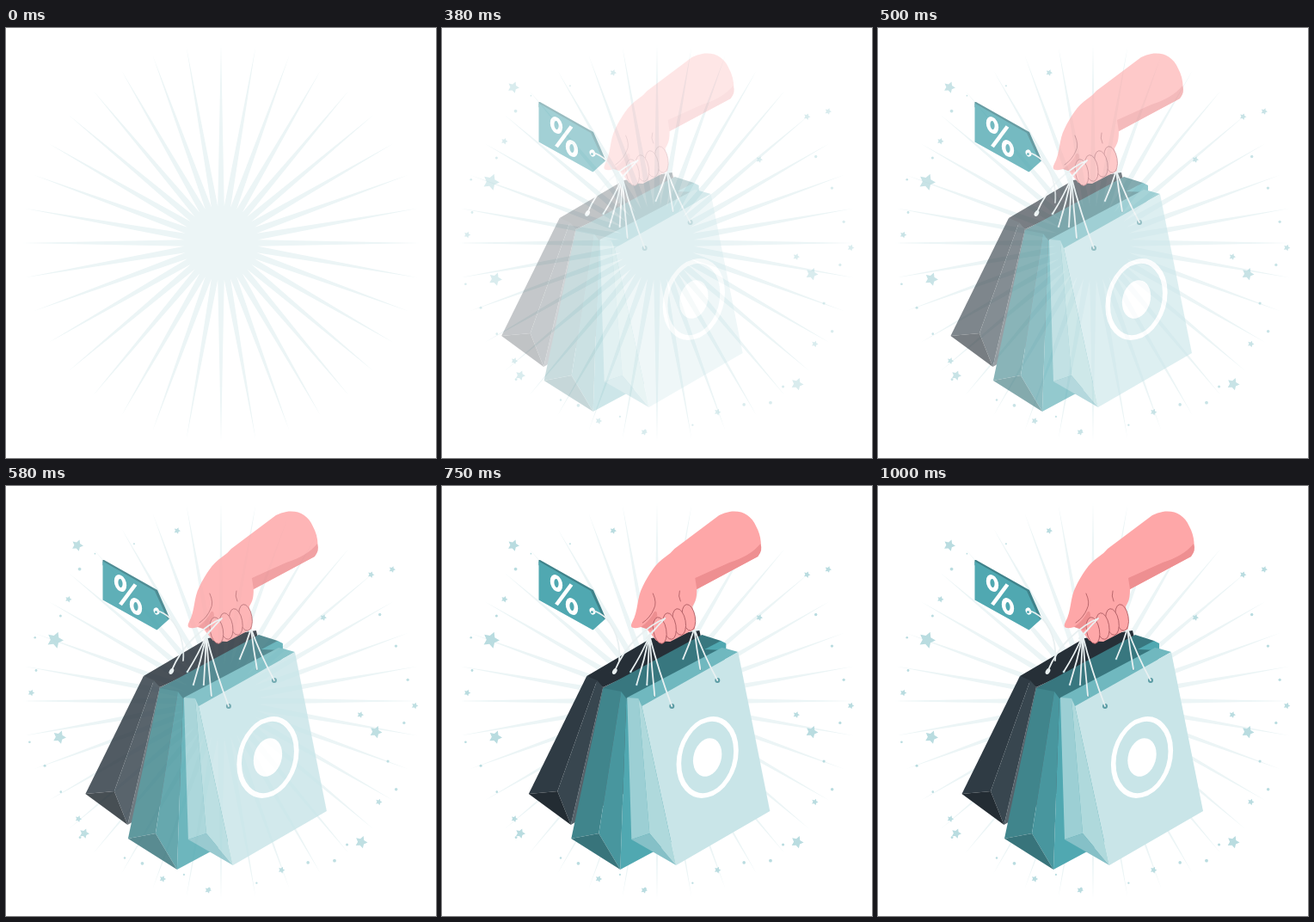
These frames come from a looping animation (500 px wide and 500 px high, 1.04 s). An HTML page:

```html
<!DOCTYPE html>
<html lang="en">
<head>
<meta charset="utf-8">
<title>Shopping bags</title>
<style>
  html, body { margin: 0; width: 100%; height: 100%; overflow: hidden; background: #fff; }
  svg { display: block; width: 100vw; height: 100vh; }
  .cord { fill: none; stroke: #e9f0f1; stroke-width: 1.8; stroke-linecap: round; }
  .crease { fill: none; stroke: #a9575e; stroke-width: .8; stroke-linecap: round; }
  .finger { fill: #fea7a8; stroke: #a9575e; stroke-width: .8; }
</style>
</head>
<body>
<svg viewBox="0 0 500 500">
  <path id="rays" fill="#ecf5f6"/>
  <g id="stars" fill="#b9dce0"></g>

  <g class="slide">
    <g class="slide">
      <g id="bags"></g>
      <g id="rightCords"></g>
      <g id="hand">
        <path fill="#fea7a8" d="M331 30C346 28 356 34 362 47C368 58 370 73 364 82L293 120C293 129 292 134 288 140L291 166L262 181L246 180L233 164C228 163 224 166 220 165C216 165 216 162 218 158C225 146 223 130 230 117C237 103 244 91 257 82Q263 78 267 73L319 34Q325 31 331 30Z"/>
        <path fill="#ee8f91" d="M367 67Q370 75 364 82L293 120L291 107L331 89Q356 81 367 67Z"/>
        <path fill="#ee8f91" d="M228 164Q239 156 243 147Q247 143 247 152L240 168Z"/>
        <g id="fingers"></g>
        <path class="crease" d="M242 125Q247 136 243 143Q239 153 230 159M273 122Q271 128 274 134"/>
      </g>
      <g id="leftCords"></g>
    </g>
    <g transform="translate(307 315.500) skewY(-13)">
      <ellipse rx="33.300" ry="43.800" fill="none" stroke="#fff" stroke-width="5.600"/>
      <ellipse rx="16.700" ry="22" fill="#fff"/>
    </g>
  </g>

  <g id="tag">
    <path fill="#3f828a" d="M112.500 86L114 86L176 121L190.500 154L187 156L112.500 92Z"/>
    <path fill="#50a8b1" d="M112.500 87.500L173 122L187.500 154L190 154.500L175.500 167.500L112.500 132.500Z"/>
    <g fill="none" stroke="#fff" stroke-width="4.600">
      <ellipse rx="4.900" ry="7.300" transform="translate(133 113) skewY(20)"/>
      <ellipse rx="4.900" ry="7.300" transform="translate(151 140) skewY(20)"/>
      <path d="M150.500 114.500L133 138"/>
    </g>
    <ellipse cx="175" cy="145.500" rx="3.200" ry="4.200" fill="#fff" transform="rotate(-25 175 145.500)"/>
    <circle cx="174.500" cy="146.500" r="1.500" fill="#50a8b1"/>
    <path class="cord" d="M176 145Q183 147 190 153Q202 166 205 183Q207 194 206 203"/>
  </g>
</svg>

<script>
  const LOOP = 1040, FPS = 24, SLIDE = 30;
  const $ = id => document.getElementById(id);

  function add(parent, name, attrs) {
    const el = document.createElementNS('http://www.w3.org/2000/svg', name);
    for (const k in attrs) el.setAttribute(k, attrs[k]);
    parent.append(el);
  }

  // Closed star outline with n points.
  function burst(cx, cy, n, outer, inner, turn = 0) {
    let d = '';
    for (let i = 0; i < 2 * n; i++) {
      const a = turn + Math.PI * i / n, r = i % 2 ? inner : outer;
      d += (i ? 'L' : 'M') + (cx + r * Math.cos(a)).toFixed(2) + ' ' + (cy + r * Math.sin(a)).toFixed(2);
    }
    return d + 'Z';
  }

  $('rays').setAttribute('d', burst(250, 250, 36, 232, 43));

  // Large stars have set places; small stars and dots are scattered around the rim.
  const star = (x, y, r) => add($('stars'), 'path', { d: burst(x, y, 5, r, r * .52, -1.2) });
  [
    [83, 69, 7], [57, 179, 10], [62, 292, 8], [91, 404, 6], [413, 414, 7.5], [430, 286, 7.5],
    [199, 52, 4], [449, 97, 4], [369, 153, 4], [412, 266, 4], [235, 470, 4]
  ].forEach(s => star(...s));

  let seed = 7;
  const random = () => (seed = seed * 16807 % 2147483647) / 2147483647;
  const SCATTER = 32;
  for (let i = 0; i < SCATTER; i++) {
    const a = -.7 + 5 * (i + random()) / SCATTER, dist = 205 + 25 * random();
    const cx = 250 + dist * Math.cos(a), cy = 250 + dist * Math.sin(a);
    if (i % 4 === 0) star(cx, cy, 4);
    else add($('stars'), 'circle', { cx, cy, r: .8 + 1.2 * random() });
  }

  // A bag is built from its corners: rim (back, fold, front), base, and right side.
  function bag(p, c) {
    const face = (fill, ...keys) =>
      add($('bags'), 'path', { fill, d: 'M' + keys.map(k => p[k]).join('L') + 'Z' });
    face(c.inside, 'back', 'backRight', 'tip', 'right', 'front');
    face(c.front, 'front', 'right', 'baseRight', 'foot');
    face(c.side, 'back', 'fold', 'baseFold', 'base');
    face(c.gusset, 'fold', 'front', 'foot', 'baseFold');
    face(c.bottom, 'base', 'baseFold', 'foot');
  }

  bag({
    back: '165 221', fold: '177 226', front: '184 234', backRight: '240 177', tip: '296 168', right: '299 181',
    base: '97.5 358', baseFold: '131 355', foot: '146.5 394', baseRight: '230 345'
  }, { inside: '#262f37', front: '#56626a', side: '#2f3b44', gusset: '#38464f', bottom: '#232c33' });
  bag({
    back: '184 235', fold: '205 239', front: '211 247', backRight: '299 173', tip: '321 180', right: '327 191',
    base: '147 410', baseFold: '179 404', foot: '204 446', baseRight: '301 394'
  }, { inside: '#38777f', front: '#50a8b1', side: '#40858c', gusset: '#48969e', bottom: '#38747b' });
  add($('bags'), 'path', { fill: '#50a8b1', d: 'M302 190L321 180L327 183V191Z' });
  bag({
    back: '212 246', fold: '225 247', front: '229 256', backRight: '322 188', tip: '327 189', right: '341 193',
    base: '217 411', baseFold: '238 404', foot: '269 441', baseRight: '378 378'
  }, { inside: '#70b8bf', front: '#c9e5e8', side: '#9ccfd4', gusset: '#afd9dc', bottom: '#85c0c7' });

  // Cords hang from a grip point, bending slightly towards the vertical.
  function cord(layer, [gx, gy], x, y, hole) {
    add(layer, 'circle', { cx: x, cy: y, r: hole, fill: '#5b9ca4' });
    const d = `M${x} ${y}Q${gx + (x - gx) * .4} ${(y + gy) / 2} ${gx} ${gy}`;
    add(layer, 'path', { class: 'cord', d });
  }
  const left = [238, 174], right = [290, 166];
  [[216, 216], [223, 231], [235, 231], [244, 244]].forEach(p => cord($('leftCords'), left, ...p, 1.5));
  cord($('leftCords'), left, 264, 256, 3);
  [[277, 201], [297, 213]].forEach(p => cord($('rightCords'), right, ...p, 1.5));
  cord($('rightCords'), right, 317, 226, 3);
  add($('leftCords'), 'path', { class: 'cord', d: 'M197 216Q207 192 224 176T256 154M234 177L256 154M238 174L250 160' });
  add($('leftCords'), 'ellipse', { rx: 2.4, ry: 3.8, fill: '#e9f0f1', transform: 'translate(197.5 215.5) rotate(30)' });

  for (let i = 3; i >= 0; i--) {
    add($('fingers'), 'ellipse', {
      class: 'finger', rx: 7.5, ry: 15.5, transform: `translate(${250 + 11.2 * i} ${168 - 5 * i}) rotate(-10)`
    });
  }

  // cubic-bezier(.36, -.01, .5, 1.38), solved by bisection
  const curve = (s, a, b) => 3 * (1 - s) ** 2 * s * a + 3 * (1 - s) * s * s * b + s ** 3;
  function ease(p) {
    if (p >= 1) return 1;
    let lo = 0, hi = 1;
    for (let i = 0; i < 24; i++) {
      const mid = (lo + hi) / 2;
      if (curve(mid, .36, .5) < p) lo = mid; else hi = mid;
    }
    return curve(lo, -.01, 1.38);
  }

  // Steps run at 24 per second, each starting on a multiple of 10 ms.
  const startOf = n => Math.round(n * 100 / FPS) * 10;
  function stepAt(t) {
    let n = 0;
    while (n < FPS && startOf(n + 1) <= t) n++;
    return n;
  }

  // The bags sit in two nested sliding groups, the ring only in the outer one.
  const slides = document.querySelectorAll('.slide');
  function draw(t) {
    const n = stepAt(t);
    const y = n < 3 ? 0 : ease((n + .5) / FPS);
    const fade = Math.min(1, y);
    $('stars').style.opacity = $('tag').style.opacity = fade;
    for (const g of slides) {
      g.style.opacity = fade;
      g.setAttribute('transform', `translate(${((y - 1) * SLIDE).toFixed(2)} 0)`);
    }
  }

  const start = performance.now();
  function tick() {
    draw((performance.now() - start) % LOOP);
    requestAnimationFrame(tick);
  }
  tick();
</script>
</body>
</html>
```
